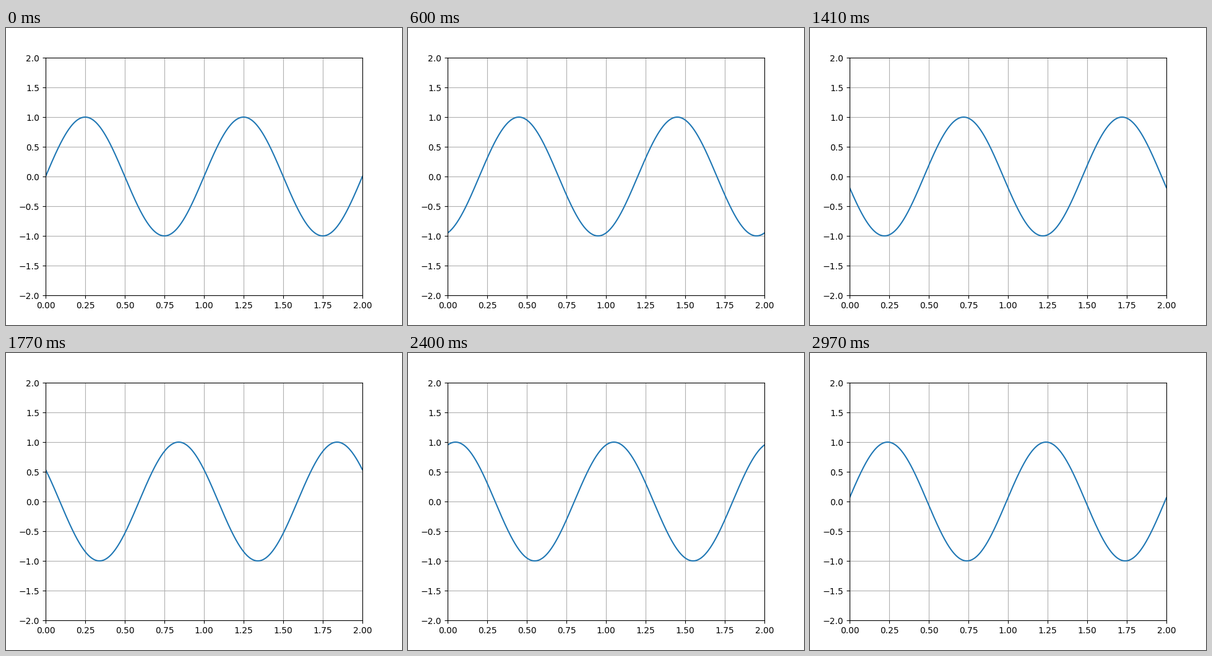
A matplotlib script that plays this animation: 640 by 480 pixels, repeating every 3000 ms.

```python
import numpy as np
import matplotlib.pyplot as plt
from matplotlib.animation import FuncAnimation

FRAMES = 100
INTERVAL = 30  # ms

fig = plt.figure(figsize=(6.4, 4.8), dpi=100)
ax = fig.add_axes([0.1, 0.1, 0.8, 0.8])
ax.set_xlim(0, 2)
ax.set_ylim(-2, 2)
ax.grid()

x = np.linspace(0, 2, 1000)
line, = ax.plot(x, np.sin(2 * np.pi * x), lw=1.5, color="tab:blue")


def update(i):
    # The wave travels one full wavelength to the right per loop.
    line.set_ydata(np.sin(2 * np.pi * (x - i / FRAMES)))
    return line,


anim = FuncAnimation(fig, update, frames=FRAMES, interval=INTERVAL,
                     repeat=True, repeat_delay=0, blit=False)
plt.show()
```
